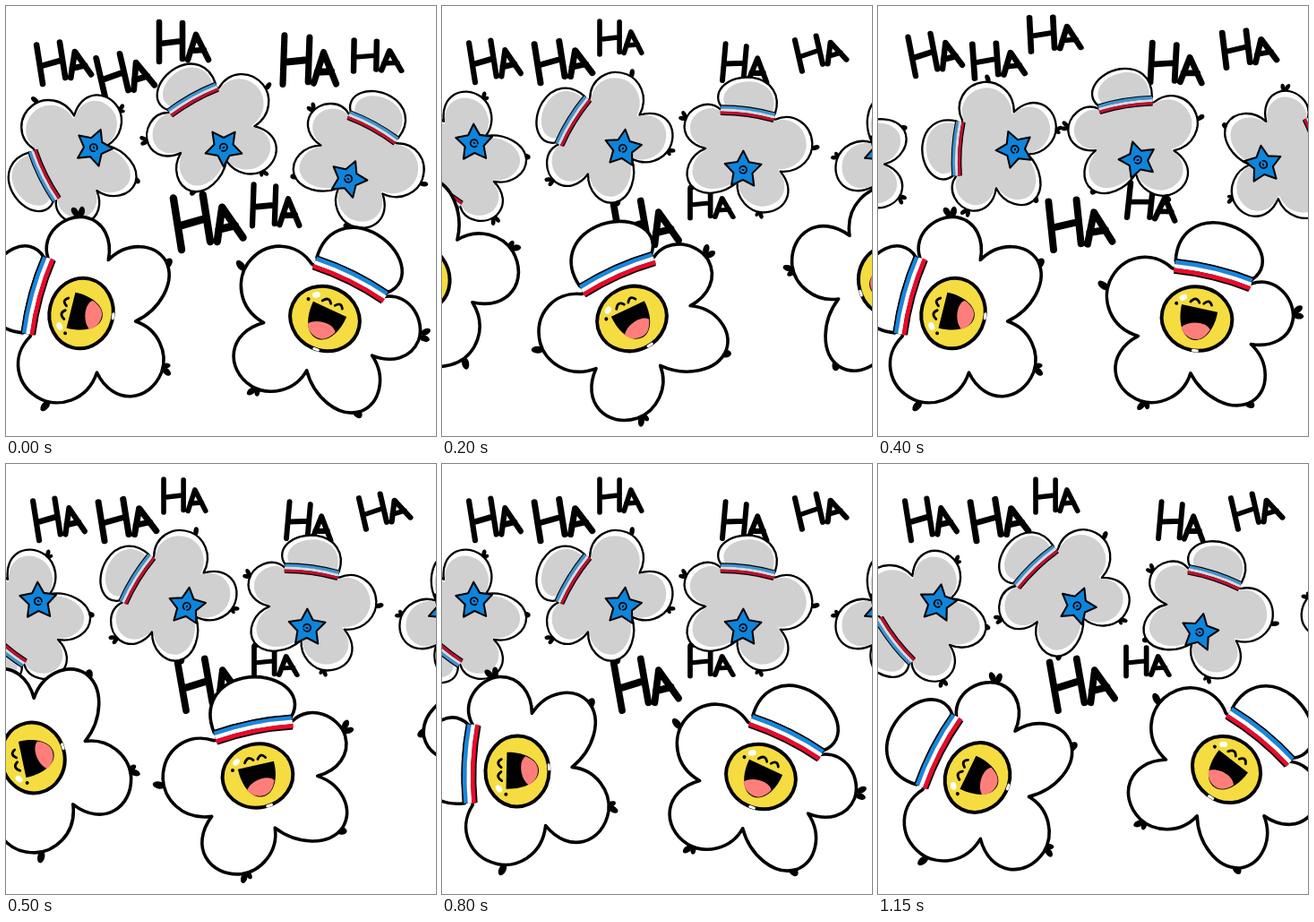
An HTML page that plays this animation: 480 px wide and 480 px high, repeating every 1200 ms.

```html
<!DOCTYPE html>
<html lang="en">
<head>
<meta charset="utf-8">
<title>Laughing flowers</title>
<style>
html, body { margin: 0; width: 100%; height: 100%; overflow: hidden; background: #fff; }
svg { display: block; width: 100vw; height: 100vh; }
</style>
</head>
<body>
<svg id="stage" viewBox="0 0 480 480" stroke-linecap="round" stroke-linejoin="round">
  <defs>
    <path id="body" d="M51-51C75-66 103-45 105-22C106 0 88 14 65 15C90 30 96 60 80 77C60 95 25 84 6 61C4 88-20 105-42 103C-78 98-92 60-60 33C-95 30-108 0-104-20C-97-52-65-65-39-49Z"/>
    <path id="dome" d="M-37-58C-42-90-22-110 8-110C46-109 72-78 51-56Q8-64-37-58Z"/>
    <path id="ha" d="M0 0V-44M26-3V-43M1-20L26-23M32-2L41-30L55-2M35-12L50-13"/>
    <g id="thorns">
      <ellipse cx="108" cy="-34" rx="6" ry="3.5" transform="rotate(-50 108 -34)"/>
      <ellipse cx="110" cy="-27" rx="6" ry="3.5" transform="rotate(-5 110 -27)"/>
      <ellipse cx="77" cy="80" rx="7" ry="4.5" transform="rotate(25 77 80)"/>
      <ellipse cx="-40" cy="108" rx="6" ry="3.5" transform="rotate(120 -40 108)"/>
      <ellipse cx="-34" cy="106" rx="5" ry="3" transform="rotate(70 -34 106)"/>
      <ellipse cx="-110" cy="-14" rx="7" ry="4" transform="rotate(25 -110 -14)"/>
    </g>
    <g id="front">
      <use href="#thorns"/>
      <use href="#body" fill="#fff" stroke="#000" stroke-width="3.6"/>
      <use href="#dome" fill="#fff" stroke="#000" stroke-width="3.6"/>
      <g class="band" data-colors="#1787df #ffffff #ea0a2c"></g>
      <ellipse rx="39.5" ry="35.5" fill="#f5dc41" stroke="#000" stroke-width="4"/>
      <path d="M3 35.5L8 35" stroke="#fff" stroke-width="3"/>
      <path d="M-20-12L21-12C22 8 13 24 1 24C-12 24-20 8-20-12Z"/>
      <path d="M-15 13C-8 3 12 1 17 9C13 19 8 23 1 23C-6 23-12 19-15 13Z" fill="#ff7e7b"/>
      <path d="M-11-17Q-6-25-1-18M4-18Q9-25 13-18" fill="none" stroke="#000" stroke-width="2.8"/>
      <ellipse cx="-20" cy="-20" rx="4.5" ry="3.2" fill="#fff" transform="rotate(-35 -20 -20)"/>
      <circle cx="-26" cy="-12" r="2"/>
    </g>
    <g id="back">
      <use href="#thorns"/>
      <use href="#body" fill="#fff" stroke="#000" stroke-width="3.4"/>
      <g fill="#d0d0d0">
        <use href="#body" transform="scale(.91)"/>
        <path d="M50-48L64 15L6 58L-57 32L-38-46Z"/>
      </g>
      <use href="#dome" fill="#fff" stroke="#000" stroke-width="3.4"/>
      <use href="#dome" fill="#d0d0d0" transform="translate(-1 -9) scale(.86)"/>
      <g class="band" data-colors="#3b93d0 #d3dbe2 #bb1230"></g>
      <g transform="translate(0 40)">
        <path id="star" fill="#0d85dc" stroke="#000" stroke-width="3"/>
        <path d="M5 3A6 6 0 1 1 6-1M-1 0H1" fill="none" stroke="#000" stroke-width="2.4"/>
      </g>
    </g>
  </defs>
  <rect width="480" height="480" fill="#fff"/>
  <g id="words" fill="none" stroke="#000" stroke-width="6.6"></g>
  <g id="far"></g>
  <g id="near"></g>
</svg>
<script>
const NS = 'http://www.w3.org/2000/svg';
const byId = id => document.getElementById(id);
const STEP = 50, STEPS = 24;

function add(parent, tag, attrs) {
  const el = document.createElementNS(NS, tag);
  for (const k in attrs) el.setAttribute(k, attrs[k]);
  parent.appendChild(el);
  return el;
}
const addUses = (parent, id, n) =>
  Array.from({ length: n }, () => add(parent, 'use', { href: '#' + id }));

// hat ribbon: three curved stripes inside a dark rim
const stripe = y => `M-37 ${y}Q8 ${y - 5} 51 ${y + 2}`;
for (const g of document.querySelectorAll('.band')) {
  add(g, 'path', { d: stripe(-52), fill: 'none', stroke: '#000', 'stroke-width': 17 });
  g.dataset.colors.split(' ').forEach((c, i) =>
    add(g, 'path', { d: stripe(-56.6 + i * 4.5), fill: 'none', stroke: c,
      'stroke-width': 4.7, 'stroke-linecap': 'butt' }));
}
for (const p of document.querySelectorAll('.band path')) p.setAttribute('stroke-linecap', 'butt');

// rounded five-pointed star
let d = '';
for (let i = 0; i < 10; i++) {
  const r = i % 2 ? 16 : 31, a = (i * 36 + 8) * Math.PI / 180;
  d += (i ? 'L' : 'M') + (r * Math.sin(a)).toFixed(1) + ' ' + (-r * Math.cos(a)).toFixed(1);
}
byId('star').setAttribute('d', d + 'Z');

// x, y, turn, width scale, height scale of each laugh, in three poses
const POSES = [
  [[41, 87, -9, 1, 1], [111, 103, -13, 1.03, 1.04], [171, 62, 0, 1, 1], [309, 87, 2, 1.08, 1.22],
   [388, 73, 1, .97, .8], [196, 272, -9, 1.27, 1.32], [275, 245, 2, .95, 1.03]],
  [[42, 78, -11, .97, 1], [108, 81, -4, 1.02, .88], [171, 51, -3, 1.01, .87], [304, 85, 3, 1.04, 1],
   [389, 69, -7, 1.03, .9], [196, 272, -6, 1.2, 1.22], [278, 236, 6, .97, .88]],
  [[37, 85, -9, .94, 1], [110, 86, -9, 1.07, 1], [176, 54, 0, .85, .84], [313, 83, 5, .9, .93],
   [402, 73, -13, .93, .82], [201, 275, -10, 1.17, 1.23], [277, 237, 0, .87, .75]]
];

// step, x, y, turn
const FAR_PATH = [
  [-4, -100, 140, -187], [-2, -31, 147, -163], [0, 36, 153, -138], [2, 98, 158, -115],
  [4, 153, 160, -85], [6, 202, 159, -57], [8, 243, 158, -28], [10, 290, 172, -8],
  [12, 336, 183, 9], [14, 382, 193, 30], [15, 405, 187, 51], [16, 430, 177, 73],
  [18, 492, 162, 113], [20, 568, 155, 150]
];
const NEAR_PATH = [
  [-10, 660, 255, 160], [-8, 575, 281, 124], [-7, 540, 294, 109], [-4, 422, 334, 51],
  [-3, 389, 341, 38], [-2, 356, 349, 25], [0, 281, 348, 0], [4, 143, 350, -51],
  [5, 111, 350, -64], [6, 84, 343, -76], [8, 30, 328, -102], [9, 0, 311, -114],
  [12, -85, 285, -152], [14, -150, 270, -180]
];

function at(path, s) {
  s = Math.max(path[0][0], Math.min(path[path.length - 1][0], s));
  const i = Math.max(1, path.findIndex(p => p[0] >= s));
  const a = path[i - 1], b = path[i], k = (s - a[0]) / (b[0] - a[0]);
  return [1, 2, 3].map(n => a[n] + (b[n] - a[n]) * k);
}
const mod = (n, m) => ((n % m) + m) % m;

const words = POSES[0].map(() => add(byId('words'), 'path',
  { d: byId('ha').getAttribute('d'), 'vector-effect': 'non-scaling-size' }));
const far = addUses(byId('far'), 'back', 5);
const near = addUses(byId('near'), 'front', 3);

function draw(step) {
  const pose = POSES[Math.floor(step % 6 / 2)];
  words.forEach((w, i) => {
    const [x, y, turn, sx, sy] = pose[i];
    w.setAttribute('transform', `translate(${x} ${y}) rotate(${turn}) scale(${sx} ${sy})`);
  });
  // the far row is placed by its stars, which sit below each flower's middle
  far.forEach((el, i) => {
    const [x, y, turn] = at(FAR_PATH, mod(step - 4, 6) + 6 * (i - 1));
    el.setAttribute('transform',
      `translate(${x} ${y}) rotate(${turn}) translate(0 -27.6) scale(-.69 .69)`);
  });
  near.forEach((el, i) => {
    const s = mod(step - 2 - 8 * i + 10, STEPS) - 10;
    const [x, y, turn] = at(NEAR_PATH, s);
    el.setAttribute('transform', `translate(${x} ${y}) rotate(${turn - (i === 1 ? 12.7 : 0)})`);
  });
}

const start = performance.now();
function tick() {
  draw(Math.floor((performance.now() - start) / STEP) % STEPS);
  requestAnimationFrame(tick);
}
tick();
</script>
</body>
</html>
```
